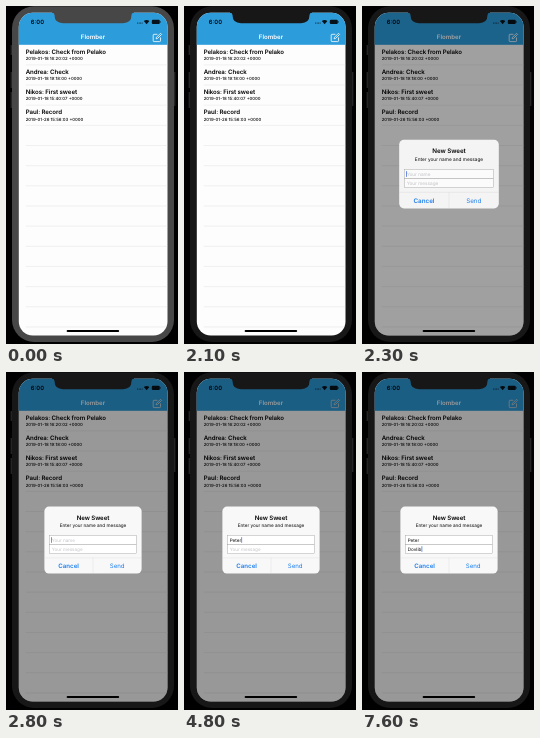
Animation, 172 px wide and 338 px high, one loop 8000 ms. Source, as an HTML page:

```html
<!DOCTYPE html>
<html lang="en">
<head>
<meta charset="utf-8">
<title>New message alert</title>
<style>
html, body { margin: 0; width: 100%; height: 100%; overflow: hidden; background: #000; }
svg { display: block; width: 172px; height: 338px; }
text { font-family: Inter, "Liberation Sans", sans-serif; text-rendering: geometricPrecision; white-space: pre; }
.bold { font-weight: 600; }
.mid { text-anchor: middle; }
.head { font-size: 6.12px; letter-spacing: -.07px; }
.date { font-size: 4.3px; font-weight: 500; }
.small { font-size: 4.6px; }
.hint { fill: #c4c4c8; }
.blue { fill: #1a7df0; }
.rule { stroke: #d0d0d4; stroke-width: .3; }
.field { fill: #fff; stroke: #999; stroke-width: .4; }
</style>
</head>
<body>
<svg viewBox="0 0 172 338">
  <defs>
    <clipPath id="glass"><rect x="12.8" y="6.8" width="148.7" height="322.8" rx="14"/></clipPath>
  </defs>
  <rect width="172" height="338"/>
  <g fill="#242424">
    <rect x="4.6" y="39" width="2" height="10" rx=".6"/>
    <rect x="4.6" y="66" width="2" height="16" rx=".6"/>
    <rect x="4.6" y="86" width="2" height="16" rx=".6"/>
    <rect x="167.4" y="66" width="2" height="34" rx=".6"/>
  </g>
  <rect id="body" x="6" y=".3" width="162" height="335.6" rx="22"/>

  <g clip-path="url(#glass)">
    <rect x="12" y="6" width="150" height="326" fill="#fdfdfd"/>
    <g id="list"></g>
    <rect x="12" y="6" width="150" height="32.8" fill="#2d9cdb"/>
    <text class="bold" x="24.7" y="18.2" font-size="5.85">6:00</text>
    <g fill="#05121b">
      <circle cx="131.6" cy="17" r=".5"/><circle cx="133.1" cy="17" r=".5"/>
      <circle cx="134.6" cy="17" r=".5"/><circle cx="136.1" cy="17" r=".5"/>
      <path d="M137.8 15.1Q140.6 12.7 143.4 15.1L140.6 18.2Z"/>
      <rect x="145.8" y="13.8" width="8" height="4.2" rx="1.1"/>
      <rect x="154.2" y="15.2" width=".6" height="1.4"/>
    </g>
    <text class="bold mid" x="87" y="33.2" font-size="6.12" fill="#fff">Flomber</text>
    <g id="compose" fill="none" stroke-width=".8" stroke-linejoin="round">
      <path d="M151.4 28.3H148Q147.2 28.3 147.2 29.1V34.8Q147.2 35.6 148 35.6H153.7Q154.5 35.6 154.5 34.8V31.4"/>
      <path d="M150.1 32.8L150.5 31.3L154.5 27.3L155.6 28.4L151.6 32.4Z"/>
    </g>
    <rect x="60.6" y="324" width="52.6" height="2.1" rx="1"/>
    <rect id="dim" x="12" y="6" width="150" height="326"/>
  </g>
  <path id="notch" d="M46 6V6.8Q48.5 6.8 48.5 9.1Q48.5 17.2 57 17.2H117Q125.5 17.2 125.5 9.1Q125.5 6.8 128 6.8V6Z"/>

  <g id="alert">
    <rect x="38.4" y="134.6" width="97.2" height="67" rx="4.7" fill="#f8f8f8"/>
    <text class="bold mid head" x="87" y="147.9">New Sweet</text>
    <text class="mid" x="87" y="154.9" font-size="4.65">Enter your name and message</text>
    <rect class="field" x="43.6" y="163.6" width="86.8" height="8.9"/>
    <rect class="field" x="43.6" y="172.5" width="86.8" height="8.9"/>
    <text class="small" id="name" x="45.7" y="169.7"></text>
    <text class="small" id="message" x="45.7" y="178.7"></text>
    <rect id="caret" width=".75" height="5.6" fill="#3d6de0"/>
    <path class="rule" d="M38.4 185.9H135.6M87 185.9V201.6"/>
    <text class="bold mid blue" x="62.6" y="195.9" font-size="6.12">Cancel</text>
    <text class="mid blue" x="111.2" y="195.9" font-size="6.12">Send</text>
  </g>
</svg>
<script>
const LOOP = 8000, STEP = 100;
const $ = id => document.getElementById(id);

const rows = [
  ["Pelakos: Check from Pelako", "2019-01-18 16:20:02 +0000"],
  ["Andrea: Check", "2019-01-18 19:18:00 +0000"],
  ["Nikos: First sweet", "2019-01-18 15:40:07 +0000"],
  ["Paul: Record", "2019-01-26 15:56:03 +0000"]
];
const rowTop = i => 38.7 + i * 20.16;
let list = "";
for (let i = 1; i < 15; i++)
  list += `<path class="rule" d="M19.7 ${rowTop(i)}H162"/>`;
rows.forEach(([title, date], i) => {
  list += `<text class="bold head" x="19.7" y="${rowTop(i) + 9.3}">${title}</text>` +
          `<text class="date" x="19.7" y="${rowTop(i) + 15.4}">${date}</text>`;
});
$("list").innerHTML = list;

// Each track is a list of [time, value]; a value holds until the next one.
const tracks = {
  body: [[0, "#474747"], [700, "#2e2e2e"], [800, "#171717"]],
  press: [[0, 1], [1600, .6], [1800, .75], [1900, .9], [2000, 1]],
  tint: [[0, "#fff"], [2500, "#f0f0f0"], [2700, "#dedede"], [2900, "#d0d0d0"]],
  dim: [[0, 0], [2200, .17], [2300, .37], [2400, .39], [2500, .4]],
  alpha: [[0, 0], [2200, .5], [2300, .96], [2400, 1]],
  scale: [[0, 1.2], [2200, 1.12], [2300, 1.025], [2400, 1.008], [2500, 1]],
  caret: [[0, 0], [2300, 1], [3200, .5], [3300, 0], [3600, .6], [3700, 1],
          [6000, .7], [6100, .3], [6200, 0], [6400, 1]],
  field: [[0, "name"], [5400, "message"]]
};
const fields = {
  name: { word: "Peter", keys: [3700, 4200, 4400, 4700, 4800], hint: "Your name", y: 165.2 },
  message: { word: "Dovlib", keys: [6400, 6700, 7000, 7200, 7300, 7600], hint: "Your message", y: 174.2 }
};

function at(track, t) {
  let value;
  for (const [time, v] of tracks[track]) if (time <= t) value = v;
  return value;
}

// Shows the typed part of a field and returns the caret's offset.
function fill(id, t) {
  const { word, keys, hint } = fields[id], el = $(id);
  const typed = word.slice(0, keys.filter(k => k <= t).length);
  el.textContent = typed || hint;
  el.classList.toggle("hint", !typed);
  return typed ? el.getComputedTextLength() + .2 : -.6;
}

function draw(t) {
  const body = at("body", t);
  $("body").setAttribute("fill", body);
  $("notch").setAttribute("fill", body);
  $("compose").setAttribute("stroke", at("tint", t));
  $("compose").setAttribute("opacity", at("press", t));
  $("dim").setAttribute("opacity", at("dim", t));

  const s = at("scale", t);
  $("alert").setAttribute("opacity", at("alpha", t));
  $("alert").setAttribute("transform", `translate(87 168.1) scale(${s}) translate(-87 -168.1)`);

  const ends = { name: fill("name", t), message: fill("message", t) };
  const active = at("field", t);
  $("caret").setAttribute("x", 45.7 + ends[active]);
  $("caret").setAttribute("y", fields[active].y);
  $("caret").setAttribute("opacity", at("caret", t));
}

let shown = -1;
const start = performance.now();
function tick() {
  const t = Math.floor((performance.now() - start) % LOOP / STEP) * STEP;
  if (t !== shown) draw(shown = t);
  requestAnimationFrame(tick);
}
tick();
</script>
</body>
</html>
```
